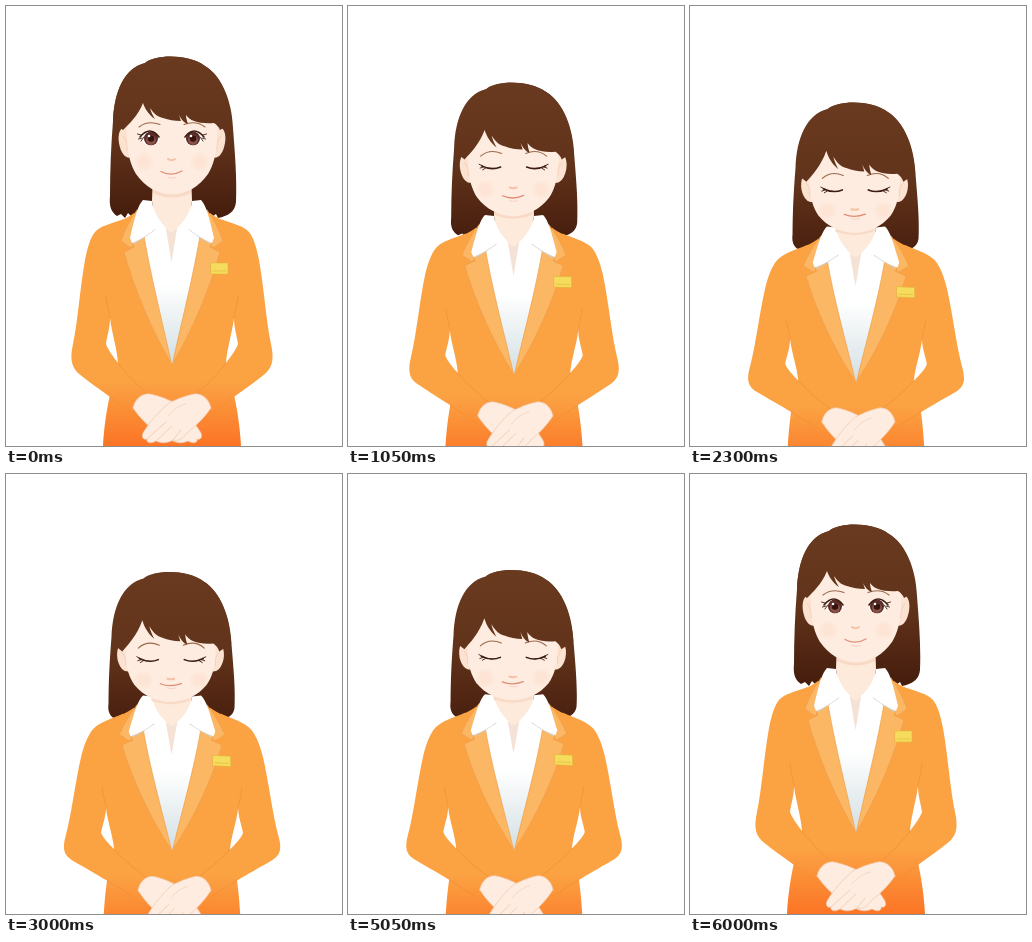
These frames come from a looping animation (336 px wide and 440 px high, 6050 ms). An HTML page:

```html
<!DOCTYPE html>
<html>
<head>
<meta charset="utf-8">
<style>
html, body { margin: 0; width: 100%; height: 100%; overflow: hidden; background: #fff; }
svg { display: block; }
</style>
</head>
<body>
<svg id="stage" width="336" height="440" viewBox="0 0 336 440" stroke-linecap="round" stroke-linejoin="round">
  <defs>
    <linearGradient id="hair" gradientUnits="userSpaceOnUse" x1="0" y1="55" x2="0" y2="212">
      <stop stop-color="#693a1f"/><stop offset=".5" stop-color="#61331a"/><stop offset="1" stop-color="#451c0d"/>
    </linearGradient>
    <linearGradient id="coat" gradientUnits="userSpaceOnUse" x1="0" y1="376" x2="0" y2="442">
      <stop stop-color="#fba243"/><stop offset="1" stop-color="#fb7324"/>
    </linearGradient>
    <linearGradient id="shirt" gradientUnits="userSpaceOnUse" x1="0" y1="278" x2="0" y2="358">
      <stop stop-color="#fff"/><stop offset="1" stop-color="#d3dfe3"/>
    </linearGradient>
    <clipPath id="eyeL"></clipPath>
    <clipPath id="eyeR"></clipPath>
  </defs>
</svg>
<script>
const LOOP = 6050, STEP = 50, AXIS = 166;
const stage = document.getElementById('stage');
const parts = [];

// Piecewise linear curve through [x, y] points
const curve = pts => x => {
  if (x <= pts[0][0]) return pts[0][1];
  for (let i = 1; i < pts.length; i++) {
    const [a, u] = pts[i - 1], [b, v] = pts[i];
    if (x <= b) return u + (v - u) * (x - a) / (b - a);
  }
  return pts[pts.length - 1][1];
};

// Depth of the bow over time
const bow = curve([[0, 0], [150, .05], [650, .33], [1000, .52], [1300, .68], [1500, .77], [1950, .895],
  [2300, .965], [2600, .99], [3250, 1], [3900, .99], [4550, .97], [5050, .955], [5200, .94],
  [5300, .87], [5850, .22], [6000, 0]]);

// How far each height moves at full bow
const headDrop = curve([[50, 47.5], [136, 48.5], [187, 40], [212, 35]]);
const faceDrop = curve([[50, 47.5], [97, 49.5], [132, 55], [153, 52], [167, 43.5], [187, 40]]);
const bodyDrop = curve([[195, 27.5], [257, 24.5], [358, 18], [400, 15], [440, 14]]);
const armDrop = curve([[235, 6], [350, 5], [380, 0]]);
const armSpread = curve([[205, 0], [240, 4], [350, 8], [385, 5], [420, 0]]);

const warps = {
  head: (x, y, p) => [x - 1.5 * p, y + p * headDrop(y)],
  face: (x, y, p) => [x - .7 * p, y + p * faceDrop(y)],
  body: (x, y, p) => [
    x + p * armSpread(y) * (x - 165) / 100,
    y + p * (bodyDrop(y) + armDrop(y) * Math.max(0, Math.abs(x - 165) - 50) / 50)
  ],
  hands: (x, y, p) => [x + p * (206 - x) / 16, y + 14.5 * p]
};

const mapPoints = (d, f) => d.replace(/([\d.]+),([\d.]+)/g,
  (_, x, y) => f(+x, +y).map(n => n.toFixed(2)).join());
const mirror = d => mapPoints(d, (x, y) => [2 * AXIS - x, y]);

function node(tag, attrs, parent) {
  const el = document.createElementNS('http://www.w3.org/2000/svg', tag);
  for (const k in attrs) el.setAttribute(k, attrs[k]);
  parent.append(el);
  return el;
}
// d is a path, or a function from eye openness to a path
function add(warp, d, attrs, parent = stage) {
  const el = node('path', attrs, parent);
  parts.push({ el, warp: warps[warp], d: typeof d === 'string' ? () => d : d });
}
function pair(warp, d, attrs) {
  add(warp, d, attrs);
  add(warp, typeof d === 'string' ? mirror(d) : o => mirror(d(o)), attrs);
}
const fill = (color, stroke = 'none', width = .7) => ({ fill: color, stroke, 'stroke-width': width });
const line = (color, width, more) => ({ fill: 'none', stroke: color, 'stroke-width': width, ...more });
const dot = (x, y) => `M${x},${y} L${x},${y}`;

const SKIN = '#fdecdf', SEAM = '#ee8f35', LAPEL = '#fbb764';
const HAIR = 'url(#hair)', COAT = 'url(#coat)';

// Hair behind
add('head', 'M139,57 C148,49 181,47 199,60 C216,70 226,95 227,122 C229,148 231,172 230,196 C229,206 222,210 212,212 L210,208 L206,211 L126,211 L122,207 L119,212 L115,208 L111,210 C105,206 103,200 104,190 C104,165 105,140 107,115 C108,86 118,62 139,57Z', fill(HAIR));

// Jacket and sleeves
pair('body', 'M128,207 C118,215 103,218 93,226 C96,262 100,290 104,312 C106,328 111,342 112,357 L104,389 C101,402 98,420 97,440 L96,470 L167,470 L167,222 L138,222Z', fill(COAT));
pair('body', 'M118,213 C104,218 94,220 89,226 C84,232 81,244 79,254 C74,282 72,314 67,338 C64,352 65,360 72,367 C84,377 106,392 128,408 L142,388 C132,380 120,368 112,357 C107,350 102,344 100,338 C101,330 104,322 104,312 C103,302 100,290 100,270Z', fill(COAT));
pair('body', 'M104,312 C103,304 101,298 100,290', line(SEAM, .7));
pair('body', 'M112,357 C120,368 132,380 142,388', line(SEAM, .7));
pair('body', 'M104,391 C112,397 120,403 128,408', line(SEAM, .7));

// Shirt, neck, lapels and collar
pair('body', 'M139,199 L167,205 L167,358 L165,358 L134,222Z', fill('url(#shirt)'));
add('body', 'M147,165 L185,165 L186,195 C185,205 180,213 171,222 L165.5,256 L160,222 C152,213 147,205 146,195Z', fill('#fdeadb'));
add('body', 'M160,222 L165.5,256 L171,222 Q165.5,230 160,222Z', fill('#f5e2d6'));
pair('body', 'M131,204 C124,213 119,224 115,235 L125,242 L132,232Z', fill(LAPEL, '#f0a04c'));
pair('body', 'M126,236 L128,241 L118,246 C128,282 145,323 165.5,358 C158,322 144,268 137,224Z', fill(LAPEL, '#f0a04c'));
pair('body', 'M126,236 L128,238 Q140,231 149,224 L146,220Z', fill('#d3cfcb'));
pair('body', 'M137,194 C132,199 129,210 124,232 L126,237 C135,233 142,229 149,223 L160,222 C152,213 147,205 146,195Z', fill('#fff'));
add('body', 'M205,257 L222,257 L222,268 L205,268Z', fill('#f6dc5c', '#e0b53a', .6));
add('body', 'M207,265 L220,265', line('#e6bd43', .8));

// Head
pair('head', 'M125,121 C116,117 111,126 113,137 C115,148 120,154 127,151Z', fill('#fce3d1'));
pair('head', 'M117,130 C120,132 122,138 121,144', line('#f3c9ae', .8));
add('head', 'M147,183 Q166,194 185,183 L185,187 Q166,196 147,187Z', fill('#f9dac7'));
pair('head', 'M167,90 L122,95 C120,125 119,150 130,168 C139,181 151,188 167,188Z', fill(SKIN));
for (const w of [18, 12]) pair('face', dot(138, 156), line('#f9b9a0', w, { opacity: .08 }));

// Eyes
const lid = o => `M134,${130 + o} Q144,${135 - 16 * o} 153,131`;
const eyeShape = o => `${lid(o)} Q154,${131 + 4 * o} 152,${131 + 5 * o} Q144,${135 + 9 * o} 136,${131 + 4 * o}Z`;
const lashes = o => `M135,${130 - o} L131.5,${128.5 - .5 * o} M136,${131 + o} L132.5,${132 + o} M138,${132 - o} L135,${134 + o}`;
pair('face', eyeShape, fill('#fff'));
[['eyeL', 145, eyeShape], ['eyeR', 187, o => mirror(eyeShape(o))]].forEach(([id, x, shape]) => {
  add('face', shape, {}, document.getElementById(id));
  const iris = node('g', { 'clip-path': `url(#${id})` }, stage);
  add('face', dot(x, 132.5), line('#5a2c27', 14), iris);
  add('face', dot(x, 134), line('#8a5148', 10), iris);
  add('face', dot(x, 132.5), line('#35130f', 6.5), iris);
  add('face', dot(x - 2, 130), line('#fff', 2.6), iris);
});
pair('face', lid, line('#3c1c12', 1.6));
pair('face', lashes, line('#3c1c12', .9));
pair('face', 'M133,121 Q142,114 154,118.5', line('#9a6a4c', 1.1));

// Nose and mouth
add('face', 'M162,153 Q165.5,155.5 169,153', line('#f5c2a8', 2));
add('face', 'M155,165.5 Q165,171 176,165', line('#e08c77', 1.3));
add('face', 'M162,171.5 Q166,173 170,171.5', line('#f8d3c3', 1));

// Fringe
add('face', 'M117,124 C122,119 132,110 137,97 C139,103 143,109 149,113 C147,110 145,106 144,102 C148,108 152,111 157,112 C163,114 168,115 175,115 L173,109 C175,113 178,117 182,118 C181,115 180,112 180,109 C184,115 193,118 208,117 C211,119 213,121 214,124 L226,117 C224,93 215,70 199,60 C181,47 148,49 139,57 C118,62 108,86 107,117Z', fill(HAIR));

// Hands
const hand = 'M205,402 C203,392 195,387 188,388 C178,390 171,393 163,397 C152,406 143,417 137,427 C135,432 138,434 141,433 C140,437 145,438 150,435 C156,438 162,437 167,434 C174,436 178,431 182,426 C190,420 198,412 205,402Z';
const CREASE = '#efc8ae';
add('hands', mirror(hand), fill(SKIN, CREASE));
add('hands', hand, fill(SKIN, CREASE));
add('hands', 'M141,433 L160,416 M150,435 L166,420 M167,434 L175,424', line(CREASE, .8));
add('hands', 'M180,398 C172,400 167,404 162,410', line('#f3d3be', .8));

const drift = { hair: 46, coat: 26, shirt: 19 };
const start = performance.now();

function draw() {
  const t = Math.floor((performance.now() - start) % LOOP / STEP) * STEP;
  const p = bow(t);
  const open = Math.max(0, 1 - p / .45);
  for (const { el, warp, d } of parts)
    el.setAttribute('d', mapPoints(d(open), (x, y) => warp(x, y, p)));
  for (const id in drift)
    document.getElementById(id).setAttribute('gradientTransform', `translate(0 ${drift[id] * p})`);
  requestAnimationFrame(draw);
}
draw();
</script>
</body>
</html>
```
